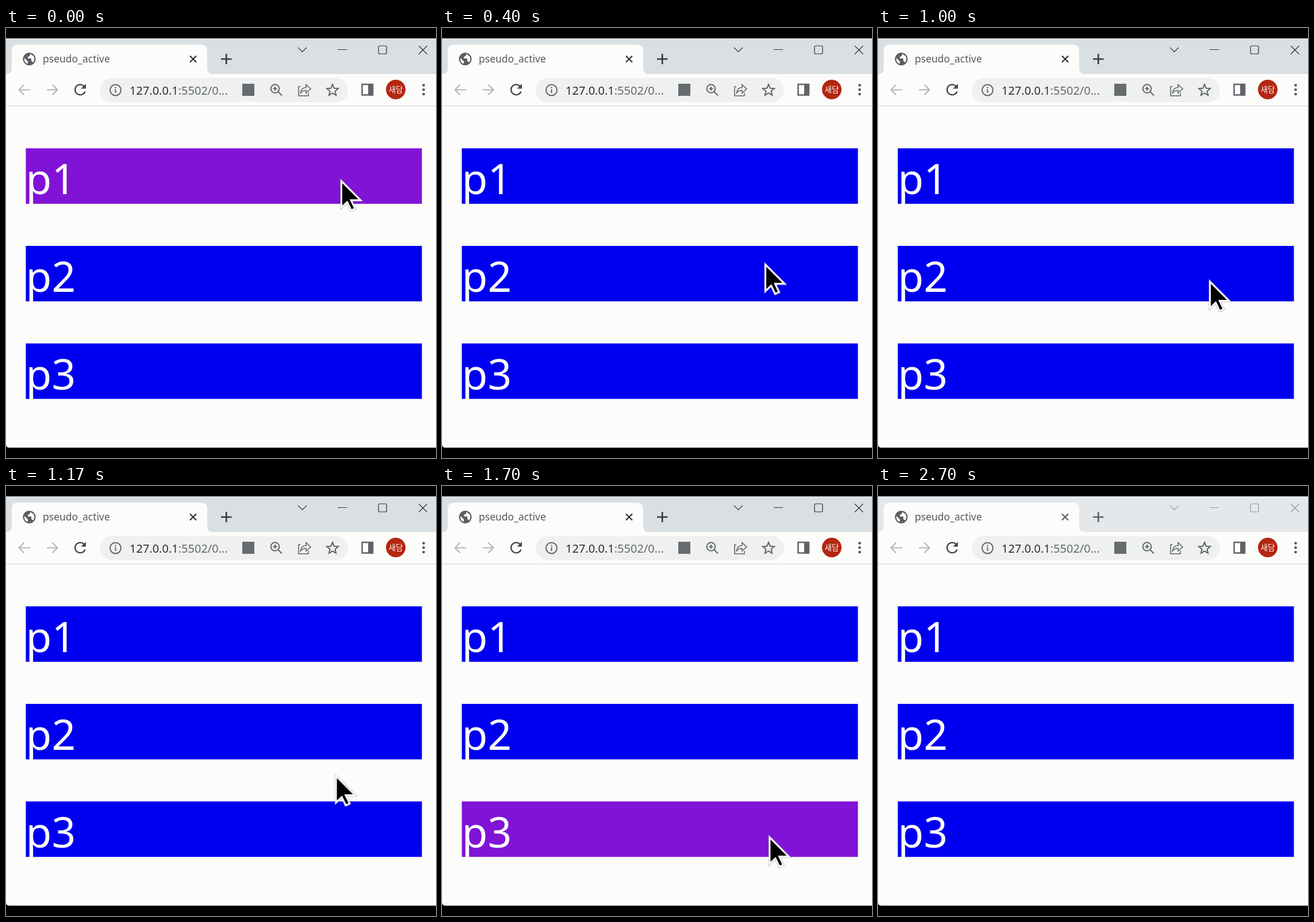
Recreate the animation shown at these times as an HTML page. Size 748 px wide and 748 px high, loop 2.73 s.

```html
<!DOCTYPE html>
<html lang="ko">
<head>
<meta charset="utf-8">
<title>pseudo_active</title>
<style>
html, body { margin: 0; width: 100%; height: 100%; overflow: hidden; background: #000; }
svg { display: block; width: 748px; height: 748px; font-family: "Noto Sans", "Open Sans", sans-serif; }
.line { fill: none; stroke: #5f6368; stroke-width: 2; }
.win { fill: none; stroke: #303236; stroke-width: 1.2; }
.bar { fill: #0000f0; }
.label { fill: #fdfdfb; font-size: 73px; }

/* One 2730 ms loop: press and release on each paragraph */
.bar, .strip, .win, .tabmark, .cursor, .fade { animation: 2730ms infinite; }
.b1 { animation-name: press1; animation-timing-function: step-end; }
.b2 { animation-name: press2; animation-timing-function: step-end; }
.b3 { animation-name: press3; animation-timing-function: step-end; }
@keyframes press1 { 0% { fill: #8113d6; } 1.099%, 100% { fill: #0000f0; } }
@keyframes press2 { 0%, 36.63% { fill: #0000f0; } 20.879% { fill: #8113d6; } }
@keyframes press3 { 0%, 67.033% { fill: #0000f0; } 56.044% { fill: #8113d6; } }

.cursor { animation-name: move; animation-timing-function: linear; }
@keyframes move {
  0% { transform: translate(582px, 263px); }
  1.099% { transform: translate(582px, 263px); animation-timing-function: cubic-bezier(.45, 0, .65, .88); }
  14.652% { transform: translate(561px, 408px); animation-timing-function: ease-out; }
  19.414%, 20.879% { transform: translate(575px, 436px); }
  26.74% { transform: translate(576px, 438px); }
  36.63% { transform: translate(576px, 438px); animation-timing-function: ease-in-out; }
  51.282%, 56.044% { transform: translate(567px, 606px); }
  62.271%, 100% { transform: translate(568.5px, 608px); }
}
.fade { animation-name: fade; animation-timing-function: linear; }
@keyframes fade { 0%, 67.033% { opacity: 1; } 74.359%, 100% { opacity: 0; } }

/* The window loses focus at the end */
.strip { animation-name: strip; animation-timing-function: step-end; }
.win { animation-name: win; animation-timing-function: step-end; }
.tabmark { animation-name: tabmark; animation-timing-function: step-end; }
@keyframes strip { 0% { fill: #d9dfe2; } 97.802% { fill: #dfe4e7; } 98.901%, 100% { fill: #e4e8eb; } }
@keyframes win { 0% { stroke: #303236; } 97.802% { stroke: #686b6e; } 98.901%, 100% { stroke: #96999c; } }
@keyframes tabmark { 0% { stroke: #34373b; } 97.802% { stroke: #494c50; } 98.901%, 100% { stroke: #5c6064; } }
</style>
</head>
<body>
<svg viewBox="0 0 748 748">
  <path d="M0 18H748V730H6Q0 730 0 724Z" fill="#fcfcfa"/>
  <rect class="strip" y="18" width="748" height="62" fill="#d9dfe2"/>
  <path d="M0 80Q10 80 10 70V40Q10 29 21 29H339Q350 29 350 40V70Q350 80 360 80Z" fill="#fcfcfa"/>
  <path d="M0 135.5H748" stroke="#dddedd" stroke-width="1.4"/>

  <!-- Tab -->
  <circle cx="40.5" cy="54" r="11" fill="#5a5e63"/>
  <path d="M32 52L38 58V62Q31 61 32 52ZM42 45Q43 49 38 50V53H44V57L47 60Q51 55 48 49Z" fill="#fcfcfa"/>
  <text x="64" y="60" font-size="17.5" fill="#55585c">pseudo_active</text>
  <path d="M320 48.5L331 59.5M331 48.5L320 59.5" class="tabmark" stroke="#34373b" stroke-width="2.3"/>
  <path d="M374 54H392.500M383.200 45V63" class="tabmark" stroke="#34373b" stroke-width="2.6"/>

  <!-- Window buttons -->
  <path class="win" d="M508 34L515.500 41.500L523 34M577 37.500H593M718 31L732.500 45.500M732.500 31L718 45.500"/>
  <rect class="win" x="648" y="31" width="14" height="14" rx="2"/>

  <!-- Toolbar -->
  <g class="line">
    <path d="M42 107.500H23M31.500 98.500L22.500 107.500L31.500 116.500M71 107.500H89M80.500 98.500L89.500 107.500L80.500 116.500" stroke="#b2b4b6"/>
    <path d="M136 101.500A9 9 0 1 0 137.500 110.500" stroke="#44474b" stroke-width="2.300"/>
  </g>
  <path d="M139 97V105.500H130.500Z" fill="#44474b"/>
  <rect x="163" y="87" width="432" height="42" rx="21" fill="#eff1f0"/>
  <circle class="line" cx="190.500" cy="108" r="9.500"/>
  <path class="line" d="M190.500 106.500V113M190.500 102.500V104.700"/>
  <text x="215" y="116" font-size="20" fill="#2a2c2f">127.0.0.1<tspan fill="#65696d">:5502/0...</tspan></text>
  <rect x="411" y="97" width="21" height="21" fill="#676b70"/>
  <g class="line">
    <circle cx="468" cy="105.500" r="7.300"/>
    <path d="M473.500 111L480 117.500M464.500 105.500H471.500M468 102V109"/>
    <path d="M512 102H509V118H526V113M512.500 113Q513.500 103.500 522 103.500V98.500L530 106L522 113V108.500Q516 108.500 512.500 113Z" stroke-width="1.600"/>
    <path d="M568 98L570.800 104.700L578 105.300L572.500 110L574.200 117L568 113.200L561.800 117L563.500 110L558 105.300L565.200 104.700Z"/>
    <rect x="619.500" y="98" width="18.500" height="18.500" stroke-width="2.500"/>
  </g>
  <rect x="630" y="97" width="9" height="20.500" fill="#5f6368"/>
  <circle cx="678" cy="107" r="17" fill="#b3260f"/>
  <text x="678" y="112" font-size="13.500" text-anchor="middle" fill="#fff" font-family="'Noto Sans CJK KR', 'Noto Sans CJK', sans-serif">새담</text>
  <g fill="#505458">
    <circle cx="726.500" cy="99.500" r="2.300"/>
    <circle cx="726.500" cy="107.300" r="2.300"/>
    <circle cx="726.500" cy="115" r="2.300"/>
  </g>

  <!-- Page -->
  <rect class="bar b1" x="34.500" y="209.300" width="689" height="96.500"/>
  <rect class="bar b2" x="34.500" y="379" width="689" height="96.500"/>
  <rect class="bar b3" x="34.500" y="548.700" width="689" height="96.500"/>
  <g class="label">
    <text x="34.500" y="289">p1</text>
    <text x="34.500" y="458.700">p2</text>
    <text x="34.500" y="628.500">p3</text>
  </g>

  <g class="fade">
    <g class="cursor">
      <path id="arrow" d="M1.500 3.500V49L11.500 39.500L18.500 54L25 51L18 36.500H34.500Z" fill="none" stroke="#a4a4a4" stroke-width="4"/>
      <path d="M1.500 3.500V49L11.500 39.500L18.500 54L25 51L18 36.500H34.500Z" fill="#000" stroke="#fff" stroke-width="2.800"/>
    </g>
  </g>
</svg>
</body>
</html>
```
